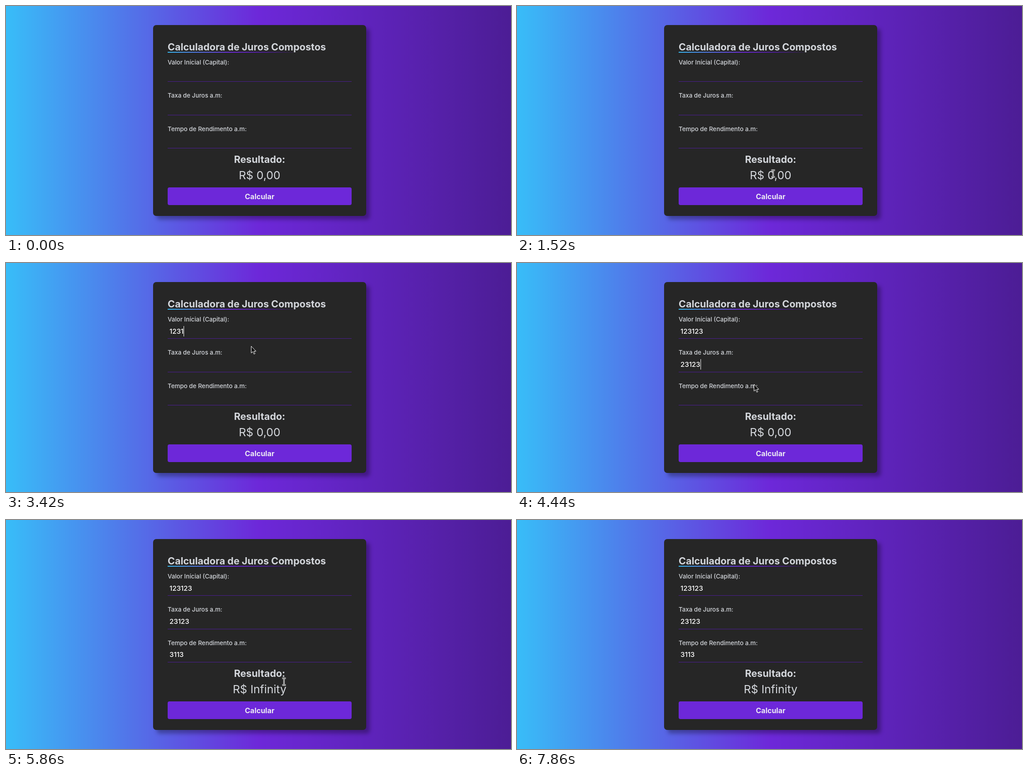
An HTML page that plays this animation: 1109x505 px, repeating every 8000 ms.

```html
<!DOCTYPE html>
<html lang="pt-BR">
<head>
<meta charset="utf-8">
<title>Calculadora de Juros Compostos</title>
<style>
  html, body { margin: 0; width: 100%; height: 100%; overflow: hidden; }
  body { background: linear-gradient(90deg, #38bdf8, #6d28d9 50%, #4c1d95); }
  svg { display: block; width: 1109px; height: 505px; font-family: Inter, "Open Sans", sans-serif; }
  text { fill: #d4d7dc; }
  .card { fill: #262626; filter: drop-shadow(8px 8px 4px rgba(0, 0, 0, .3)); }
  .title { font-size: 21.5px; font-weight: 700; }
  .label { font-size: 13.3px; font-weight: 500; }
  .value { font-size: 15px; font-weight: 500; fill: #fff; }
  .mid { text-anchor: middle; }
</style>
</head>
<body>
<svg viewBox="0 0 1109 505">
  <defs>
    <linearGradient id="underline">
      <stop offset="0" stop-color="#38bdf8"/>
      <stop offset=".5" stop-color="#6d28d9"/>
      <stop offset=".75" stop-color="#4c1d95"/>
      <stop offset="1" stop-color="#4c1d95" stop-opacity="0"/>
    </linearGradient>
    <path id="bar" d="M-4 -7.5H-1Q0 -7.5 0 -6V6Q0 7.5 -1 7.5H-4M4 -7.5H1Q0 -7.5 0 -6V6Q0 7.5 1 7.5H4"/>
  </defs>
  <rect class="card" x="323" y="42" width="468" height="421" rx="7"/>
  <rect x="355" y="101" width="281" height="2" fill="url(#underline)"/>
  <text class="title" x="355" y="98">Calculadora de Juros Compostos</text>
  <g id="fields"></g>
  <text class="title mid" x="557" y="345.5">Resultado:</text>
  <text id="result" class="mid" x="557" y="381.5" font-size="24.7"></text>
  <rect id="button" x="355" y="400" width="404" height="39" rx="4"/>
  <text class="mid" x="557" y="425.5" font-size="16" font-weight="700" style="fill:#eceaf4">Calcular</text>
  <rect id="caret" width="1" height="23" fill="#fff"/>
  <g id="cursor" stroke-linejoin="round">
    <path id="arrow" d="M0 0V15L3.5 11.8L6 17.4L8.4 16.4L6 11H10.5Z" fill="#111" stroke="#fff"/>
    <g id="beam" fill="none">
      <use href="#bar" stroke="#fff" stroke-width="3"/>
      <use href="#bar" stroke="#222"/>
    </g>
    <path id="hand" d="M-1.5 1Q0 -1 1.5 1V6Q3 5 4 6.6Q5.5 5.8 6.2 7.3Q8 7 8 9V13L6 19H-1.5L-5 12.5Q-5.5 10 -3.5 10.5L-1.5 12.5Z" fill="#fff" stroke="#111"/>
  </g>
</svg>
<script>
const LOOP = 8000, KEY_GAP = 80, ROW = 73.45;
const $ = id => document.getElementById(id);

// Paths take progress k and the point where the previous leg ended.
const bend = (cx, cy, x, y) => (k, [px, py]) => {
  const mix = (a, b, c) => (1 - k) ** 2 * a + 2 * k * (1 - k) * b + k * k * c;
  return [mix(px, cx, x), mix(py, cy, y)];
};
const to = (x, y) => (k, [px, py]) => [px + (x - px) * k, py + (y - py) * k];
const arc = (cx, cy, rx, ry, from, end) => k => {
  const a = from + (end - from) * k;
  return [cx + rx * Math.cos(a), cy - ry * Math.sin(a)];
};

// Pointer legs: start, end, path. It rests between legs.
const legs = [
  [300, 1020, arc(593, 240, 300, 198, .1, 3.46)],
  [1020, 1420, bend(420, 560, 577, 422)],
  [1420, 1520, to(562, 369)],
  [1720, 1920, to(571, 417)],
  [1920, 2420, to(572, 142)],
  [3120, 3620, to(515, 211)],
  [4240, 4540, to(522, 295)],
  [5040, 5340, to(542, 407)],
  [5340, 5540, to(548, 421)],
  [5740, 5860, to(610, 356)],
  [5860, 7260, arc(560, 228, 104, 146, -1.07, 2 * Math.PI - .29)],
  [7360, 7760, to(1050, 490)]
];

const fields = [
  { label: 'Valor Inícial (Capital):', value: '123123', focus: 2520, typing: 3180, blur: 3840 },
  { label: 'Taxa de Juros a.m:', value: '23123', focus: 3840, typing: 3820, blur: 4640 },
  { label: 'Tempo de Rendimento a.m:', value: '3113', focus: 4640, typing: 4920, blur: 5540 }
];

fields.forEach((f, i) => {
  f.y = i * ROW;
  $('fields').insertAdjacentHTML('beforeend', `
    <text class="label" x="355" y="${129 + f.y}">${f.label}</text>
    <text class="value" x="359" y="${155.5 + f.y}"></text>
    <rect x="355" y="${Math.round(166.45 + f.y)}" width="404" height="1" fill="#4c1d95"/>`);
  f.text = $('fields').querySelectorAll('.value')[i];
});

// The screen refreshes ten times a second, with a slight drift.
function tick(t) {
  const drift = t < 3700 ? 20 : t < 5800 ? 40 : 60;
  return Math.floor((t - drift) / 100) * 100 + drift;
}

function pointerAt(t) {
  let point = [0, 0];
  for (const [start, end, path] of legs) {
    if (t < start && start > 300) break;
    point = path(Math.min(1, Math.max(0, (t - start) / (end - start))), point);
  }
  return point.map(Math.round);
}

const inside = (x, y, l, t, r, b) => x >= l && x <= r && y >= t && y <= b;

function pointerKind(x, y) {
  if (inside(x, y, 355, 400, 759, 439)) return 'hand';
  const overText = inside(x, y, 355, 76, 705, 105) || inside(x, y, 500, 324, 615, 388)
    || fields.some(f => inside(x, y, 355, 134 + f.y, 759, 167 + f.y));
  return overText ? 'beam' : 'arrow';
}

function show(id, on) { $(id).style.display = on ? '' : 'none'; }

function draw(time) {
  const t = tick(time);
  const [x, y] = pointerAt(t);
  const kind = pointerKind(x, y);
  show('cursor', time >= 300 && time < 7860);
  $('cursor').setAttribute('transform', `translate(${x + .5} ${y + .5})`);
  for (const id of ['arrow', 'beam', 'hand']) show(id, id === kind);

  $('button').setAttribute('fill', kind === 'hand' && y > 410 ? '#4c1d95' : '#6d28d9');
  $('result').textContent = t < 5640 ? 'R$ 0,00' : 'R$ Infinity';

  for (const f of fields) {
    const typed = Math.max(0, Math.floor((t - f.typing) / KEY_GAP) + 1);
    f.text.textContent = f.value.slice(0, typed);
  }
  const active = fields.find(f => t >= f.focus && t < f.blur);
  const blink = t >= 3020 && t < 3220;
  show('caret', active && !blink);
  if (active) {
    const width = active.text.textContent ? active.text.getComputedTextLength() : 0;
    $('caret').setAttribute('x', Math.round(359 + width));
    $('caret').setAttribute('y', Math.round(138.55 + active.y));
  }
}

function frame() {
  draw(performance.now() % LOOP);
  requestAnimationFrame(frame);
}
frame();
</script>
</body>
</html>
```
